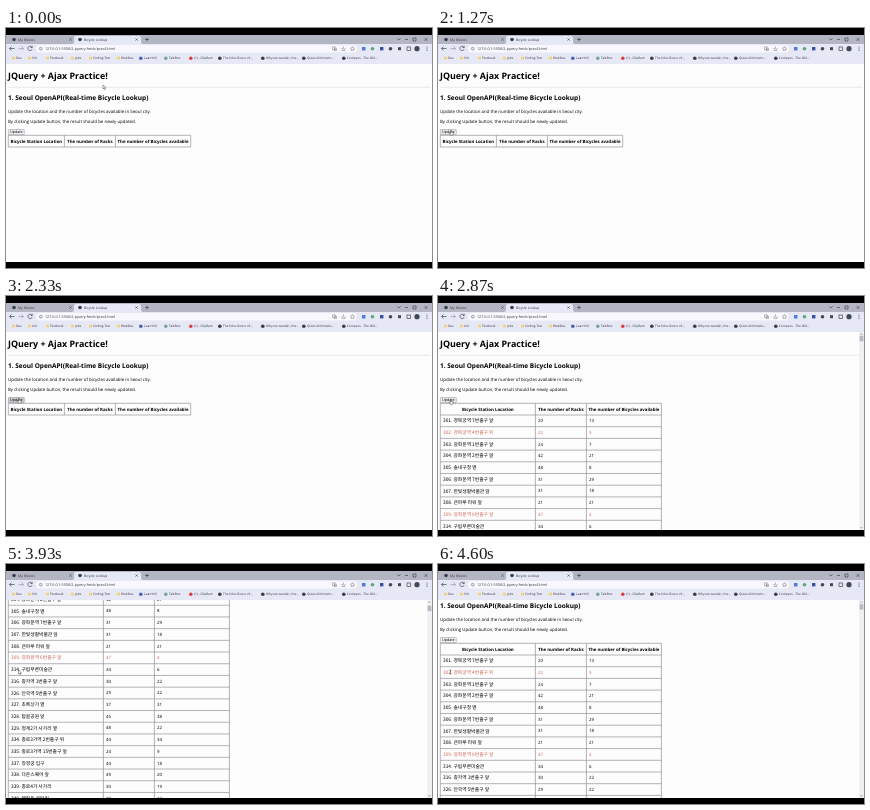
Write an HTML page that moves like this. It is 426x240 px and loops after 4.67 s.

```html
<!DOCTYPE html>
<html>
<head>
<meta charset="utf-8">
<title>Bicycle Lookup</title>
<style>
  html, body { margin: 0; width: 100%; height: 100%; overflow: hidden; background: #000; }
  svg { display: block; width: 426px; height: 240px; }
  text {
    font-family: "Open Sans", "Noto Sans CJK KR", "Noto Sans CJK", sans-serif;
    font-size: 4.4px;
    fill: #000;
    text-rendering: geometricPrecision;
    white-space: pre;
  }
  .bold { font-weight: 700; }
  .mid { text-anchor: middle; }
  .ko { font-family: "Noto Sans CJK KR", "Noto Sans CJK", sans-serif; }
  .ui { fill: #33343c; }
  .low text { fill: #d0675c; }
</style>
</head>
<body>
<svg id="stage" viewBox="0 0 426 240">
  <clipPath id="view"><rect y="36" width="426" height="198"/></clipPath>
  <g id="window"></g>
  <g clip-path="url(#view)">
    <rect y="36" width="426" height="198" fill="#fdfdfe"/>
    <g id="page"></g>
    <g id="bar"></g>
  </g>
  <g id="cursor"></g>
</svg>
<script>
const LOOP = 4670, FRAME = 1000 / 15;
const CLICK = [2130, 2470], LOADED = 2730, LEAVE = 3000, REST = 4400;
const ROW = 11.7, TOP = 107.3;
const STRIP = '#b4b5c2', TOOLBAR = '#e7e8f6';

const $ = id => document.getElementById(id);

function add(parent, tag, attrs = {}) {
  const el = document.createElementNS('http://www.w3.org/2000/svg', tag);
  for (const k in attrs) el.setAttribute(k, attrs[k]);
  parent.append(el);
  return el;
}
// y is the vertical middle of the line
function text(parent, str, x, y, size = 4.4, cls = '') {
  const el = add(parent, 'text', { x, y: y + size * 0.35, class: cls });
  el.style.fontSize = size + 'px';
  el.textContent = str;
  return el;
}
const rect = (p, x, y, width, height, fill, more) => add(p, 'rect', { x, y, width, height, fill, ...more });
const dot = (p, cx, cy, r, fill) => add(p, 'circle', { cx, cy, r, fill });
const line = (p, d, stroke = '#44464e', width = 0.7) =>
  add(p, 'path', { d, stroke, 'stroke-width': width, fill: 'none' });
const cross = (p, x, y, r) => line(p, `M${x - r} ${y - r}l${2 * r} ${2 * r}m0 ${-2 * r}l${-2 * r} ${2 * r}`);

function drawWindow(g) {
  rect(g, 0, 7, 426, 9, STRIP);
  rect(g, 0, 16, 426, 20, TOOLBAR);
  add(g, 'path', { d: 'M66 16q2 0 2-2V10q0-2 2-2H133q2 0 2 2v4q0 2 2 2z', fill: TOOLBAR });
  for (const [x, title] of [[8, 'My Movies'], [74, 'Bicycle Lookup']]) {
    dot(g, x, 11.5, 1.8, '#3b3d45');
    text(g, title, x + 4, 11.5, 3.4, 'ui');
    cross(g, x + 56.5, 11.5, 1);
  }
  line(g, 'M139 11.5h4m-2-2v4');
  line(g, 'M391.5 10.5l1.5 1.5 1.5-1.5M399 11.5h3M407 10h3v3h-3z');
  cross(g, 420, 11.5, 1.3);

  line(g, 'M8.5 20.5h-5l2-2m-2 2l2 2');
  line(g, 'M12.5 20.5h5l-2-2m2 2l-2 2', '#9a9ca6');
  line(g, 'M26 19.3a2.2 2.2 0 1 0 .2 1.8M26.2 17.8v1.7h-1.7');
  rect(g, 30, 17, 321, 7.4, '#f8f8fe', { rx: 3.7 });
  line(g, 'M33.3 20.7a1.5 1.5 0 1 0 3 0a1.5 1.5 0 1 0-3 0M34.8 20.3v1.2', '#666', 0.5);
  text(g, '127.0.0.1:5500/2-jquery-fetch/prac4.html', 39, 20.6, 3.7, 'ui');
  line(g, 'M326.5 18.8h2.8v2.8h-2.8zM328.3 20.3h2.2v2.2h-2.2z', '#777', 0.5);
  line(g, 'M336 20v2.5h3V20M337.5 21.2v-2.8', '#777', 0.5);
  line(g, 'M346.5 18.5l.7 1.4 1.5.2-1.1 1 .3 1.5-1.4-.7-1.4.7.3-1.5-1.1-1 1.5-.2z', '#777', 0.5);
  rect(g, 356, 19, 3.5, 3.5, '#4f7fd6');
  dot(g, 366.5, 20.7, 1.8, '#5aa877');
  rect(g, 374, 19, 3.4, 3.4, '#3d4fa0');
  dot(g, 384.5, 20.7, 1.8, '#44464e');
  rect(g, 392, 19.2, 3, 3, '#44464e');
  rect(g, 401, 19, 3.4, 3.4, 'none', { stroke: '#444', 'stroke-width': 0.7 });
  dot(g, 411, 20.7, 2.6, '#3e4a58');
  for (const y of [19, 20.7, 22.4]) dot(g, 421, y, 0.5, '#444');

  const folders = { Dev: 10, UIX: 26, Textbook: 44, Jobs: 69, 'Coding Test': 87, WebDev: 115 };
  for (const name in folders) {
    const x = folders[name];
    rect(g, x - 4, 28.8, 3, 2.6, '#efd477');
    text(g, name, x, 30.2, 3.2, 'ui');
  }
  const marks = [
    [138, 'Learnhill', '#4a62b5'], [163, 'TalkBox', '#74a59a'], [188, '(1) - ClipBarn', '#d9413b'],
    [217, 'The Nine Doors of...', '#3b3d45'], [260, 'Why we wander, the...', '#3b3d45'],
    [301, 'Quiet-Arithmetic...', '#3b3d45'], [341, 'Compass - The Old...', '#3b3d45']
  ];
  for (const [x, name, color] of marks) {
    dot(g, x - 3.2, 30.2, 1.8, color);
    text(g, name, x, 30.2, 3.2, 'ui');
  }
}

function grid(g, xs, rows) {
  const left = xs[0], right = xs[xs.length - 1];
  let d = '';
  for (let i = 0; i <= rows; i++) d += `M${left} ${TOP + i * ROW}H${right}`;
  for (const x of xs) d += `M${x} ${TOP}V${TOP + rows * ROW}`;
  line(g, d, '#8c8a92', 0.65);
  ['Bicycle Station Location', 'The number of Racks', 'The number of Bicycles available']
    .forEach((s, i) => text(g, s, (xs[i] + xs[i + 1]) / 2, 113.2, 4.35, 'bold mid'));
}

const stations = [
  [301, '경복궁역 7번출구 앞', 20, 13], [302, '경복궁역 4번출구 뒤', 22, 3],
  [303, '광화문역 1번출구 앞', 24, 7], [304, '광화문역 2번출구 앞', 42, 21],
  [305, '솔내구청 옆', 48, 8], [306, '광화문역 7번출구 앞', 31, 29],
  [307, '한빛생활박물관 앞', 31, 18], [308, '큰마루 타워 앞', 21, 21],
  [309, '광화문역 6번출구 앞', 47, 4], [314, '구립푸른미술관', 34, 6],
  [316, '종각역 1번출구 앞', 30, 22], [326, '안국역 5번출구 앞', 29, 22],
  [327, '초록상가 옆', 37, 31], [328, '탑골공원 앞', 45, 38],
  [329, '청계2가 사거리 옆', 48, 22], [334, '종로3가역 2번출구 뒤', 44, 34],
  [335, '종로3가역 15번출구 앞', 24, 9], [337, '창경궁 입구', 44, 18],
  [338, '다온스퀘어 앞', 49, 20], [339, '종로4가 사거리', 30, 19],
  [340, '혜화동 로터리', 20, 12], [341, '종로5가 사거리', 25, 11], [342, '동묘앞역 1번출구 뒤', 30, 14]
];

const page = $('page'), bar = $('bar'), cursor = $('cursor');
drawWindow($('window'));

text(page, 'JQuery + Ajax Practice!', 2, 48, 8.9, 'bold');
line(page, 'M2 59.2H424', '#e2e2ea', 0.8);
text(page, '1. Seoul OpenAPI(Real-time Bicycle Lookup)', 2, 70.2, 6.5, 'bold');
text(page, 'Update the location and the number of bicycles available in Seoul city.', 2, 83);
text(page, 'By clicking Update button, the result should be newly updated.', 2, 93.6);
const button = rect(page, 2.3, 101.5, 16, 5.2, '#f0f0f2', { rx: 0.6, stroke: '#8e8e94', 'stroke-width': 0.5 });
text(page, 'Update', 10.3, 104, 3.7, 'mid');

const empty = add(page, 'g'), full = add(page, 'g');
grid(empty, [2.3, 58.4, 109.4, 184.7], 1);
grid(full, [2.3, 97.4, 148.4, 223.4], stations.length + 1);
stations.forEach(([id, name, racks, bikes], i) => {
  const y = 113 + (i + 1) * ROW;
  const row = add(full, 'g', { class: bikes < 5 ? 'low' : '' });
  text(row, `${id}. ${name}`, 5, y, 4.8, 'ko');
  text(row, racks, 100, y);
  text(row, bikes, 151, y);
});

rect(bar, 421, 36, 5, 198, '#f1f1f3');
line(bar, 'M422.3 38.8l1.2-1.3 1.2 1.3M422.3 231l1.2 1.3 1.2-1.3', '#777', 0.6);
const thumb = rect(bar, 421.6, 40, 3.8, 5.5, '#b9b9c2');

const shapes = {
  arrow: add(cursor, 'path', { d: 'M0 0v4l1-.9.7 1.5.7-.3-.7-1.5h1.3z', fill: '#fff', stroke: '#222', 'stroke-width': 0.4 }),
  hand: add(cursor, 'path', { d: 'M-.4 0h.8v1.7l1.7.4v1.6l-.6 1h-2l-1.4-1.9.5-.4 1 .6z', fill: '#fff', stroke: '#222', 'stroke-width': 0.45 }),
  beam: line(cursor, 'M-.8 0h1.6M0 0v4M-.8 4h1.6', '#333', 0.5)
};

// rows of [time, value...], linear between them
const scrollSteps = [[2950, 0], [3330, 47], [3930, 124.3], [4070, 135], [4200, 124], [4600, 28], [4670, 18]];
const cursorSteps = [[0, 97, 57], [70, 95, 58], [330, 36, 93], [530, 13, 102.5], [2730, 13, 102.5], [3130, 12.5, 106]];

function at(steps, t) {
  const i = steps.findIndex(s => s[0] > t);
  if (i === 0) return steps[0].slice(1);
  if (i < 0) return steps[steps.length - 1].slice(1);
  const a = steps[i - 1], b = steps[i], k = (t - a[0]) / (b[0] - a[0]);
  return a.slice(1).map((v, n) => v + (b[n + 1] - v) * k);
}
const show = (el, on) => el.setAttribute('visibility', on ? 'visible' : 'hidden');

function render(time) {
  const t = Math.floor((time % LOOP + 5) / FRAME) * FRAME;
  const loaded = t >= LOADED - 5;
  const [scroll] = at(scrollSteps, t);
  const [x, y] = at(cursorSteps, t);
  const over = t > 460 && t < LEAVE;
  const pressed = t >= CLICK[0] && t < CLICK[1];

  page.setAttribute('transform', `translate(0 ${-scroll})`);
  show(empty, !loaded);
  show(full, loaded);
  show(bar, loaded);
  thumb.setAttribute('y', 39.8 + scroll * 0.015);
  button.setAttribute('fill', pressed ? '#cacad2' : over ? '#ebebee' : '#f0f0f2');

  const kind = over ? 'hand' : t > REST ? 'beam' : 'arrow';
  for (const k in shapes) show(shapes[k], k === kind);
  cursor.setAttribute('transform', `translate(${x} ${y})`);
}

const start = performance.now();
function tick() {
  render(performance.now() - start);
  requestAnimationFrame(tick);
}
tick();
</script>
</body>
</html>
```
